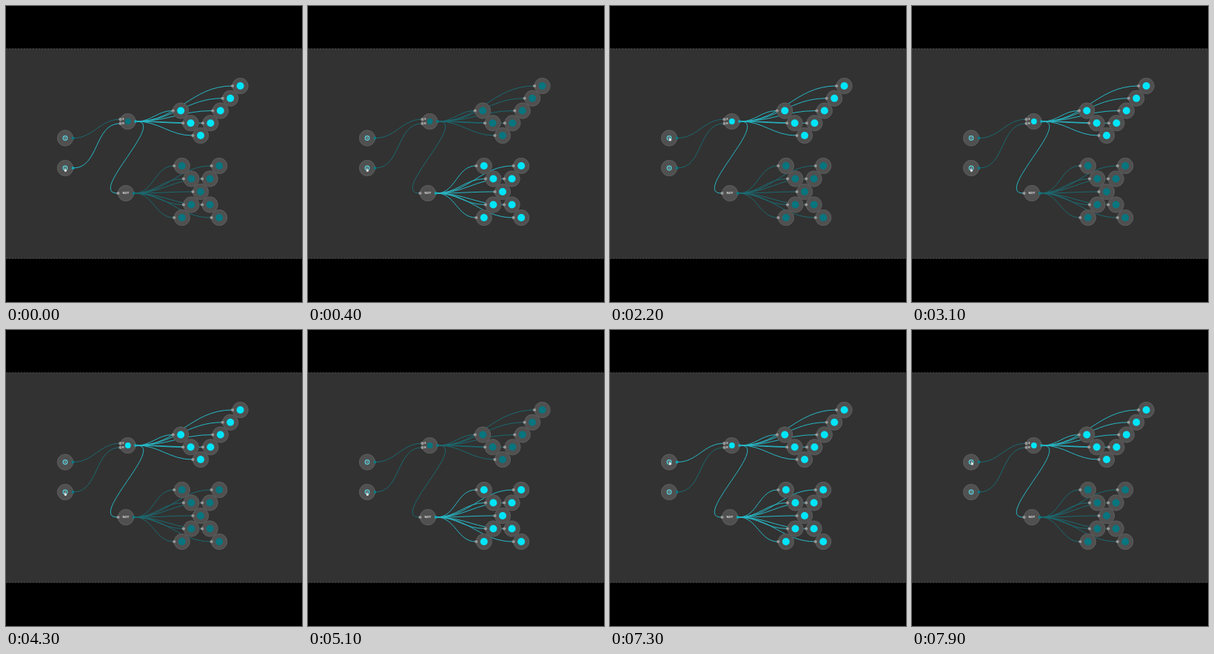
An HTML page with a canvas that plays this animation: 400x400 px, repeating every 8000 ms.

```html
<!DOCTYPE html>
<html lang="en">
<head>
<meta charset="utf-8">
<title>Latch circuit</title>
<style>
html, body { margin: 0; width: 100%; height: 100%; overflow: hidden; background: #000; }
canvas { display: block; width: 400px; height: 400px; }
</style>
</head>
<body>
<canvas id="stage"></canvas>
<script>
const canvas = document.getElementById('stage');
const ratio = window.devicePixelRatio || 1;
canvas.width = canvas.height = 400 * ratio;
const ctx = canvas.getContext('2d');
ctx.scale(ratio, ratio);

const LOOP = 8000, STEP = 100;
const FIRST_SET = 1800, PRESS_GAP = 2700, PULSE = 200;
const LAMP_ON = '#00e5fb', LAMP_OFF = '#08757f';
const WIRE_ON = '#27b9c7', WIRE_OFF = '#1b6a71';

const setButton = { x: 80, y: 178.5 };
const resetButton = { x: 80, y: 219 };
const latch = { x: 164.5, y: 156 };
const inverter = { x: 162, y: 253 };

// One lamp group forms a tick, the other a cross
const checkLamps = [], crossLamps = [];
for (let i = -2; i <= 4; i++) {
  checkLamps.push({ x: 263 + 13.4 * i, y: 175 - 16.75 * Math.abs(i) });
}
for (let i = -2; i <= 2; i++) {
  for (const side of i ? [-1, 1] : [0]) {
    crossLamps.push({ x: 263 + 12.6 * side * Math.abs(i), y: 251 + 17.5 * i });
  }
}

// The loop opens with a reset; set and reset then alternate at equal gaps
function lastPress(time) {
  if (time < 0) return { high: true, age: Infinity };
  if (time < FIRST_SET) return { high: false, age: time };
  const since = time - FIRST_SET;
  return { high: Math.floor(since / PRESS_GAP) % 2 === 0, age: since % PRESS_GAP };
}

// After each press the pointer rests, then glides to the other button
function pointerAt(press) {
  const t = Math.min(1, Math.max(0, (press.age - 800) / 500));
  const ease = t * t * (3 - 2 * t);
  const down = press.high ? ease : 1 - ease;
  return { x: 80.5 - down, y: 179 + 41.5 * down };
}

function dot(x, y, r, fill) {
  ctx.beginPath();
  ctx.arc(x, y, r, 0, Math.PI * 2);
  ctx.fillStyle = fill;
  ctx.fill();
}

function ring(x, y, r, color, width) {
  ctx.beginPath();
  ctx.arc(x, y, r, 0, Math.PI * 2);
  ctx.strokeStyle = color;
  ctx.lineWidth = width;
  ctx.stroke();
}

function wire(x1, y1, x2, y2, on) {
  const reach = Math.hypot(x2 - x1, y2 - y1) * 0.4;
  ctx.beginPath();
  ctx.moveTo(x1, y1);
  ctx.bezierCurveTo(x1 + reach, y1, x2 - reach, y2, x2, y2);
  ctx.strokeStyle = on ? WIRE_ON : WIRE_OFF;
  ctx.lineWidth = 1;
  ctx.stroke();
}

function body({ x, y }) {
  dot(x, y, 11, '#505050');
  ring(x, y, 10.5, '#5d5d5d', 0.9);
}

function inputPort(x, y) { dot(x, y, 2.1, '#969696'); }

function outputPort(x, y, on) { dot(x, y, 1.9, on ? '#16a7b5' : '#0c7983'); }

function lamp({ x, y }, on) {
  body({ x, y });
  inputPort(x - 10.5, y);
  dot(x, y, 5, on ? LAMP_ON : LAMP_OFF);
}

function button({ x, y }, on) {
  body({ x, y });
  ring(x, y, 2.8, '#5ad3df', 1.2);
  ctx.fillStyle = '#8fe0e8';
  ctx.fillRect(x - 0.5, y - 1.2, 1, 2.4);
  outputPort(x + 10.5, y, on);
}

function label(text, x, y, size) {
  ctx.fillStyle = '#f2f2f2';
  ctx.font = `bold ${size}px "Liberation Sans", sans-serif`;
  ctx.textAlign = 'center';
  ctx.textBaseline = 'middle';
  ctx.fillText(text, x, y);
}

function pointer({ x, y }) {
  ctx.beginPath();
  ctx.moveTo(x, y - 1);
  ctx.lineTo(x + 2.6, y + 1.8);
  ctx.lineTo(x + 1.8, y + 3.6);
  ctx.lineTo(x - 0.6, y + 3.2);
  ctx.closePath();
  ctx.fillStyle = '#eeeeee';
  ctx.fill();
}

function background() {
  ctx.fillStyle = '#000';
  ctx.fillRect(0, 0, 400, 400);
  ctx.fillStyle = '#323232';
  ctx.fillRect(0, 57.5, 400, 284);
  ctx.strokeStyle = '#484848';
  ctx.lineWidth = 1;
  ctx.setLineDash([2, 2]);
  ctx.beginPath();
  for (const y of [58, 341]) {
    ctx.moveTo(0, y);
    ctx.lineTo(400, y);
  }
  ctx.stroke();
  ctx.setLineDash([]);
}

function draw(time) {
  // The signal takes one step to pass each gate
  const press = lastPress(time);
  const output = lastPress(time - STEP).high;
  const inverted = !lastPress(time - 2 * STEP).high;
  const pulsing = press.age < PULSE;
  const setOn = pulsing && press.high, resetOn = pulsing && !press.high;

  background();
  wire(91, 178.5, 154, 153.2, setOn);
  wire(91, 219, 154, 158.8, resetOn);
  wire(176.5, 156, 150.5, 253, output);
  for (const { x, y } of checkLamps) wire(176.5, 156, x - 11, y, output);
  for (const { x, y } of crossLamps) wire(174, 253, x - 11, y, inverted);

  button(setButton, setOn);
  button(resetButton, resetOn);

  body(latch);
  dot(latch.x + 0.3, latch.y, 3.9, press.high ? LAMP_ON : LAMP_OFF);
  inputPort(154.5, 153.2);
  inputPort(154.5, 158.8);
  label('S', 158.4, 153.4, 3.4);
  label('R', 158.4, 159, 3.4);
  outputPort(175, latch.y, output);

  body(inverter);
  inputPort(151.5, inverter.y);
  label('NOT', inverter.x, inverter.y + 0.1, 4.2);
  outputPort(172.7, inverter.y, inverted);

  for (const spot of checkLamps) lamp(spot, output);
  for (const spot of crossLamps) lamp(spot, inverted);
  pointer(pointerAt(press));
}

function frame() {
  const time = performance.now() % LOOP;
  draw(Math.floor(time / STEP) * STEP);
  requestAnimationFrame(frame);
}
frame();
</script>
</body>
</html>
```
